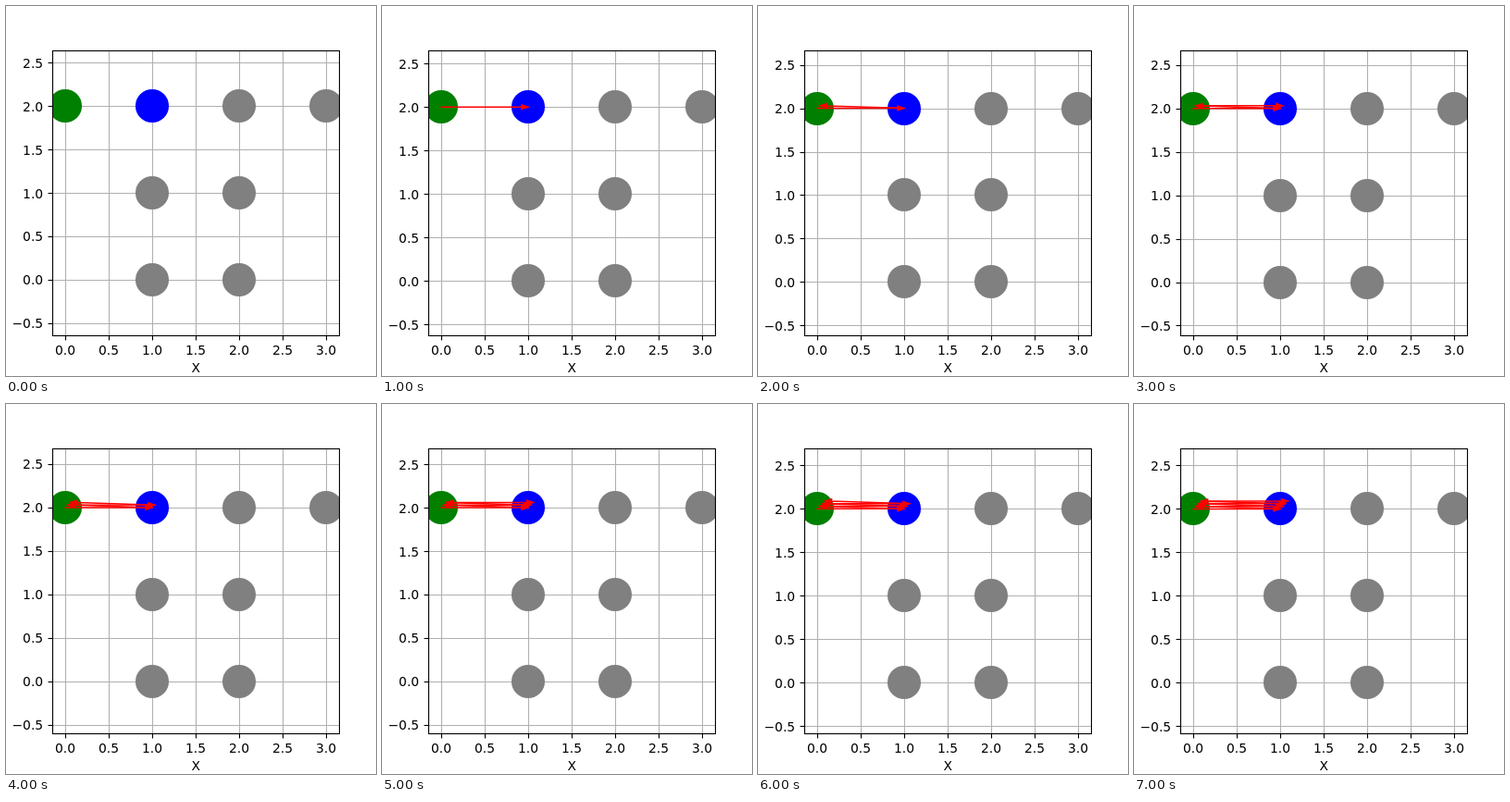
Animation, 400 px wide and 400 px high, one loop 8000 ms. Source, as an HTML page:

```html
<!DOCTYPE html>
<html lang="en">
<head>
<meta charset="utf-8">
<title>Grid walk</title>
<style>
  html, body { margin: 0; width: 100%; height: 100%; overflow: hidden; background: #fff; }
  svg { display: block; width: 400px; height: 400px; }
  text { font: 13.889px "DejaVu Sans", sans-serif; }
</style>
</head>
<body>
<svg id="plot" viewBox="0 0 400 400">
  <clipPath id="area"><rect x="50" y="48" width="311" height="309"/></clipPath>
</svg>
<script>
const STEP = 1000, STEPS = 8;
const SCALE = 310 / 3.3;                    // pixels per data unit
const LEFT = 50, TOP = 48, RIGHT = 360, BOTTOM = 356, MID = 202;
const LINE = 1.11;
const HEAD_LEN = 0.075, HEAD_HALF = 0.025, SHAFT_HALF = 0.0005;
const DRIFT = 0.03;                         // offset added on each revisit

const px = x => LEFT + (x + 0.15) * SCALE;
const py = y => MID - (y - 1) * SCALE;
const svg = document.getElementById('plot');

function add(parent, tag, attrs, text) {
  const el = document.createElementNS('http://www.w3.org/2000/svg', tag);
  for (const key in attrs) el.setAttribute(key, attrs[key]);
  if (text) el.textContent = text;
  parent.append(el);
  return el;
}
const line = (parent, d, stroke) =>
  add(parent, 'path', { d, stroke, 'stroke-width': LINE, fill: 'none' });
const label = n => n.toFixed(1).replace('-', '\u2212');

const grid = add(svg, 'g');
const dots = add(svg, 'g', { 'clip-path': 'url(#area)' });
const arrows = add(svg, 'g', {
  fill: '#f00', stroke: '#f00', 'stroke-width': 1.389, 'stroke-miterlimit': 4
});
const frame = add(svg, 'g');

for (let x = 0; x <= 3; x += 0.5) {
  const c = Math.round(px(x));
  line(grid, `M${c + 0.5} ${TOP}V${BOTTOM}`, '#b0b0b0');
  line(frame, `M${c + 0.5} 356.5V361.5`, '#000');
  add(frame, 'text', { x: c, y: 377, 'text-anchor': 'middle' }, label(x));
}
add(frame, 'text', { x: 205.2, y: 396, 'text-anchor': 'middle' }, 'X');

const rows = [];
for (let y = -0.5; y <= 2.5; y += 0.5) {
  rows.push({
    y,
    rule: line(grid, `M${LEFT} .5H${RIGHT}`, '#b0b0b0'),
    tick: line(frame, 'M45.5 .5H50.5', '#000'),
    text: add(frame, 'text', { x: 40.2, 'text-anchor': 'end' }, label(y))
  });
}
add(frame, 'rect', {
  x: LEFT + 0.5, y: TOP + 0.5, width: RIGHT - LEFT, height: BOTTOM - TOP,
  fill: 'none', stroke: '#000', 'stroke-width': LINE
});

const nodes = [
  [0, 2, '#008000'], [1, 2, '#00f'], [2, 2], [3, 2],
  [1, 1], [2, 1], [1, 0], [2, 0]
].map(([x, y, fill = '#808080']) => ({
  y, el: add(dots, 'circle', { cx: Math.round(px(x)), r: 18.05, fill })
}));

// Outline of an arrow in data units, tip first.
function outline([x0, y0], [x1, y1]) {
  const len = Math.hypot(x1 - x0, y1 - y0);
  const ux = (x1 - x0) / len, uy = (y1 - y0) / len;
  return [
    [0, 0], [HEAD_LEN, HEAD_HALF], [HEAD_LEN, SHAFT_HALF], [len, SHAFT_HALF],
    [len, -SHAFT_HALF], [HEAD_LEN, -SHAFT_HALF], [HEAD_LEN, -HEAD_HALF]
  ].map(([back, side]) => [x1 - ux * back - uy * side, y1 - uy * back + ux * side]);
}

// The walk alternates between two nodes, shifted a little on each visit.
const stop = i => {
  const d = DRIFT * Math.floor(i / 2);
  return [i % 2 + d, 2 + d];
};

// The view stays centred on the data, so every arrow pushes it down a bit.
const shifts = [0], moves = [];
for (let i = 1, top = 2; i < STEPS; i++) {
  const pts = outline(stop(i - 1), stop(i));
  top = Math.max(top, ...pts.map(p => p[1]));
  shifts.push((top - 2) / 2 * SCALE);
  moves.push(add(arrows, 'polygon', {
    points: pts.map(([x, y]) => `${px(x).toFixed(3)},${py(y).toFixed(3)}`).join(' ')
  }));
}

function show(step) {
  const shift = shifts[step];
  for (const { y, rule, tick, text } of rows) {
    const at = py(y) + shift, move = `translate(0 ${Math.round(at)})`;
    rule.setAttribute('transform', move);
    tick.setAttribute('transform', move);
    text.setAttribute('y', Math.floor(at) + 6);
  }
  for (const { y, el } of nodes) el.setAttribute('cy', Math.round(py(y) + shift));
  arrows.setAttribute('transform', `translate(0 ${shift})`);
  moves.forEach((el, i) => el.setAttribute('visibility', i < step ? 'visible' : 'hidden'));
}

let start, shown = 0;
show(0);
function tick(now) {
  start ??= now;
  const step = Math.floor((now - start) / STEP) % STEPS;
  if (step !== shown) show(shown = step);
  requestAnimationFrame(tick);
}
requestAnimationFrame(tick);
</script>
</body>
</html>
```
